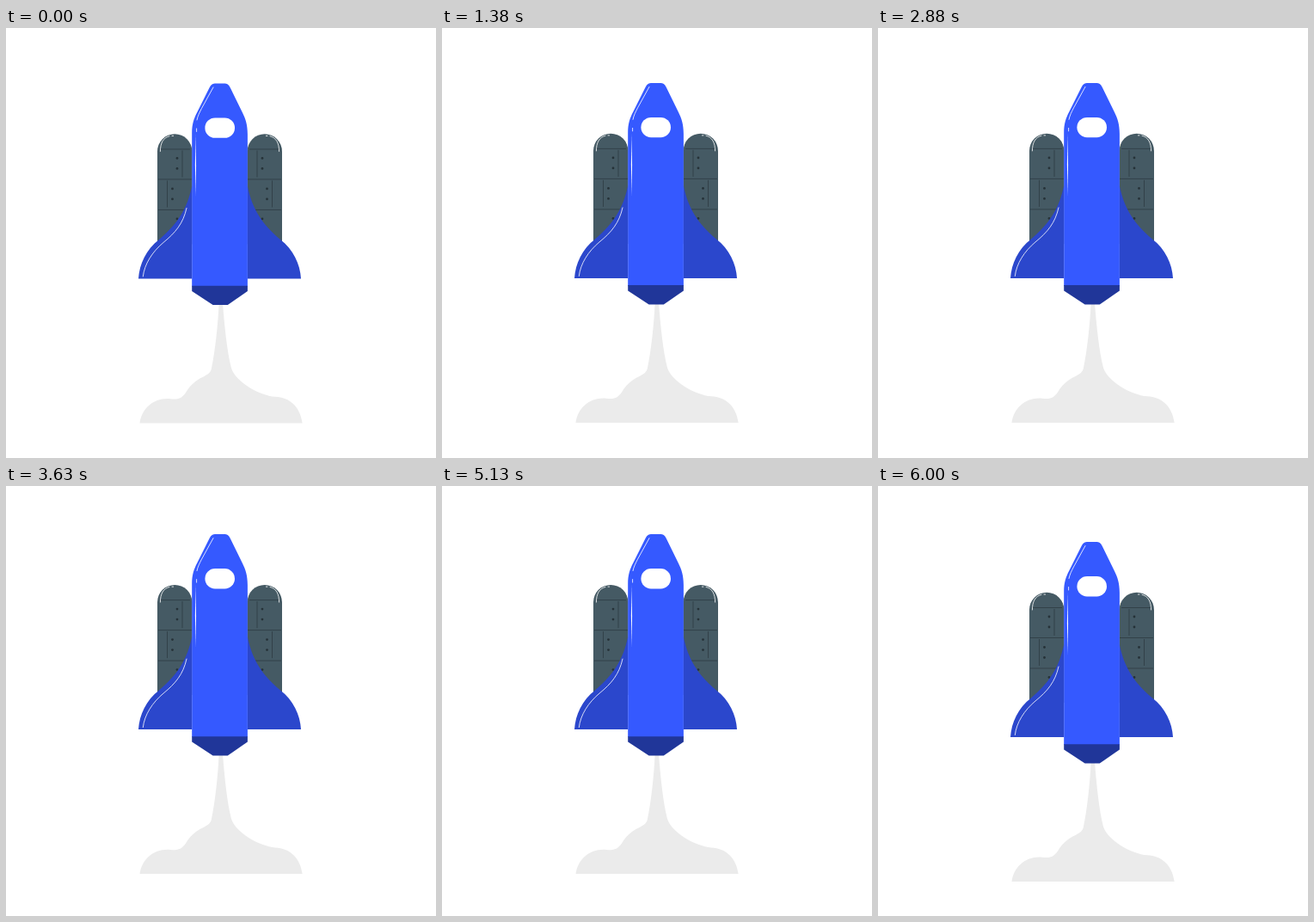
Animation of 500 by 500 pixels, one loop 6.04 s. Source, as an HTML page:

```html
<!DOCTYPE html>
<html lang="en">
<head>
<meta charset="utf-8">
<title>Shuttle</title>
<style>
  html, body { margin: 0; height: 100%; overflow: hidden; background: #fff; }
  svg { display: block; width: 100%; height: 100%; }
  .line { fill: none; stroke: #263238; stroke-width: .6; }
  .shine { fill: none; stroke: #fff; stroke-width: .8; stroke-linecap: round; }
</style>
</head>
<body>
<svg viewBox="0 0 500 500">
  <defs>
    <g id="side">
      <path fill="#455a64" d="M176 252V144A20.2 20.2 0 0 1 216.4 144V252Z"/>
      <path class="line" d="M179 141.5H214M177 176.5H216M177 212H216M205 143V174M187.5 178V209"/>
      <g fill="#263238">
        <circle cx="199" cy="152" r="1.4"/>
        <circle cx="199" cy="164" r="1.4"/>
        <circle cx="193.5" cy="187.5" r="1.4"/>
        <circle cx="193.5" cy="199.5" r="1.4"/>
        <circle cx="199" cy="222.5" r="1.4"/>
      </g>
      <path class="shine" d="M179.4 144C179.4 134 183 128 190 126.3M193 126H194.6"/>
      <path fill="#2b47cc" d="M216.2 184C211 210 200 228 178 246.5C163 258 155 275 154 292H216.2Z"/>
    </g>
  </defs>
  <g id="ship">
    <path fill="#ebebeb" d="M247.6 321C246.5 346 243 377 239 396C237 408 222 403 209 424.5C203 433 198 432.4 191 431.8C173 430 158 442 155.5 460H344.6C342 441 330 430 313 429.3C295 428 267 412 262 396C257 377 254 346 252 321Z"/>
    <use href="#side"/>
    <use href="#side" transform="matrix(-1 0 0 1 497 0)"/>
    <path class="shine" d="M159.3 289.5C161 275 170 261 183 250C197 238.5 206 228 210 210"/>
    <path fill="#3559ff" d="M216.2 301V123C216.2 112 218.5 106 222 99L236.5 70C238.5 66 240.5 65 244 65H253.5C257 65 259 66 260.8 70L275 99C278.5 106 280.9 113 280.9 124V301Z"/>
    <path fill="#203699" d="M216.2 300.2H280.9V306.5L257.8 322.5H240.6L216.2 306.5Z"/>
    <rect x="231.4" y="105" width="34.6" height="23.4" rx="11.7" fill="#fff"/>
    <path class="shine" d="M222 107.5C223 102.5 225 99 227.5 94L241 69.5M221.6 117.5V121"/>
    <path fill="#fff" d="M220.4 124Q219.3 160 220.6 196Q221.6 160 220.4 124Z"/>
  </g>
</svg>
<script>
  const LOOP = 6040, FPS = 24, BOB = 36, RISE = 10;
  const ship = document.getElementById("ship");

  // Linear bob: up and back down every 36 ticks, coming to rest at tick 144.
  function draw(now) {
    const tick = Math.min(Math.floor((now % LOOP + 5) * FPS / 1000) + 1, 144);
    const phase = tick % BOB / BOB;
    const lift = RISE * (1 - Math.abs(1 - 2 * phase));
    ship.setAttribute("transform", `translate(0 ${-lift})`);
  }

  const start = performance.now();
  function loop() {
    draw(performance.now() - start);
    requestAnimationFrame(loop);
  }
  loop();
</script>
</body>
</html>
```
